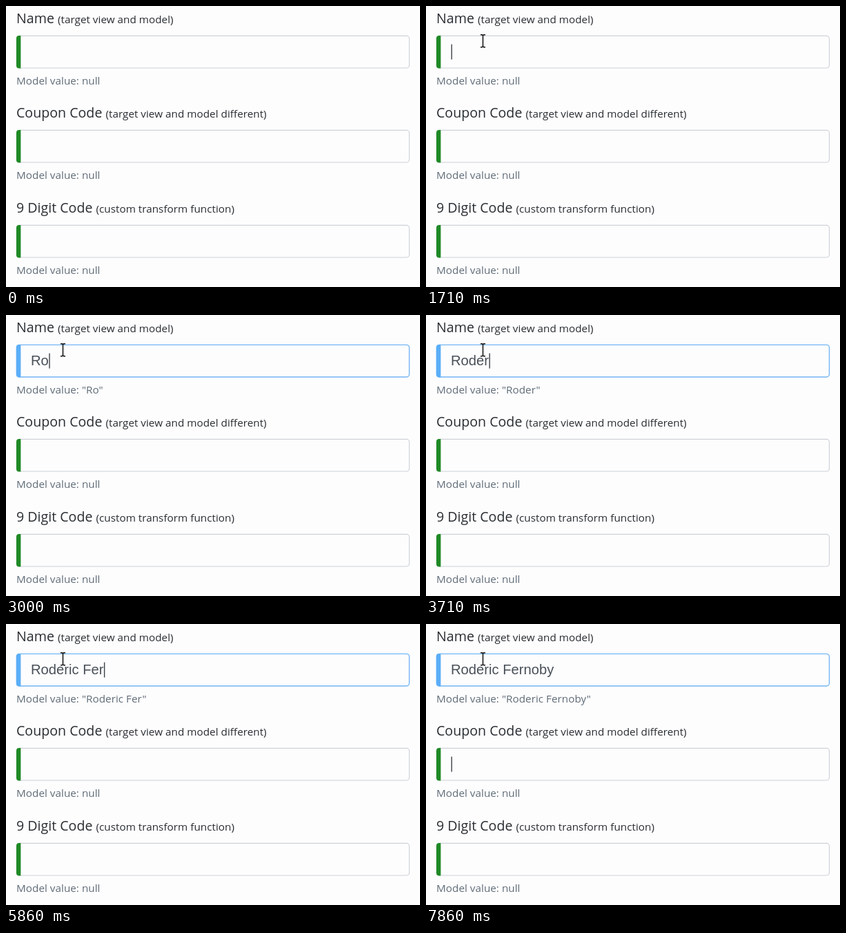
An HTML page that plays this animation: 600 px wide and 408 px high, repeating every 8 s.

```html
<!DOCTYPE html>
<html lang="en">
<head>
<meta charset="utf-8">
<title>Form inputs</title>
<style>
  html, body { margin: 0; width: 100%; height: 100%; overflow: hidden; background: #fdfdfe; }
  svg { display: block; width: 600px; height: 408px; }
  text { font-family: "Open Sans", "Noto Sans", sans-serif; white-space: pre; }
  .label { font-size: 19.6px; fill: #292d31; }
  .label tspan, .model { font-size: 15.3px; }
  .model { fill: #606c77; }
  .value { font: 20.2px "Liberation Sans", Arial, sans-serif; fill: #495057; }
  .box { fill: #fdfdfe; stroke: #ced2d8; stroke-width: 1.2; }
  .bar { fill: #1f8a25; }
  .focus .box { stroke: #74b6f3; stroke-width: 1.4; }
  .focus .bar { fill: #5aaef8; }
  .arrow { fill: #fff; stroke: #111; stroke-width: 1.2; }
  .beam { fill: none; stroke: #111; stroke-width: 1.5; }
</style>
</head>
<body>
<svg viewBox="0 0 600 408">
  <g id="rows"></g>
  <rect id="caret" width="1.4" height="22" fill="#3c4248"/>
  <path id="arrow" class="arrow" d="M0 0V19.8L4.6 15.8L8 23.3L11.2 21.9L8 14.6H13.8Z"/>
  <path id="beam" class="beam" d="M-3.5 -9H-1.2L0 -8L1.2 -9H3.5M0 -8V8M-3.5 9H-1.2L0 8L1.2 9H3.5"/>
</svg>
<script>
const LOOP = 8000, ROW = 137.4, TEXT_X = 36;
const NAME = "Roderic Fernoby";
const KEY_TIMES = [2860, 3000, 3290, 3570, 3710, 4000, 4290, 4710, 4860,
                   5570, 5860, 6000, 6430, 6570, 6860];
const FOCUS = 1710, NEXT_FOCUS = 7860, BLINK = 550;
// [time, x, y] of the pointer; it turns into a text beam inside the field
const POINTER = [[860, 98, 14], [1000, 86, 26], [1140, 78, 36], [1290, 80, 46], [1430, 82.5, 50.7]];
const LABELS = [
  ["Name", "target view and model"],
  ["Coupon Code", "target view and model different"],
  ["9 Digit Code", "custom transform function"],
];

const $ = selector => document.querySelector(selector);
const rowY = i => Math.round(i * ROW);

$("#rows").innerHTML = LABELS.map(([title, note], i) => `
  <g transform="translate(0 ${rowY(i)})">
    <text class="label" x="15" y="25">${title} <tspan dy="-0.4">(${note})</tspan></text>
    <rect class="box" x="15.3" y="43.4" width="569.2" height="46.6" rx="4"/>
    <path class="bar" d="M21.4 43V90.4H19Q15 90.4 15 86.4V47Q15 43 19 43Z"/>
    <text class="value" x="${TEXT_X}" y="73"></text>
    <text class="model" x="15" y="114">Model value: null</text>
  </g>`).join("");

const nameRow = $("#rows g"), value = $(".value"), model = $(".model");
const caret = $("#caret"), arrow = $("#arrow"), beam = $("#beam");

function show(el, visible) {
  el.style.display = visible ? "" : "none";
}

function drawCaret(t) {
  const next = t >= NEXT_FOCUS;
  const lastKey = KEY_TIMES.filter(k => k <= t).pop() ?? FOCUS;
  const blinkStart = next ? NEXT_FOCUS : lastKey;
  const width = next || !value.textContent ? 0 : value.getComputedTextLength();
  caret.setAttribute("x", TEXT_X + 0.5 + width);
  caret.setAttribute("y", 55.6 + (next ? rowY(1) : 0));
  show(caret, t >= FOCUS && Math.floor((t - blinkStart) / BLINK) % 2 === 0);
}

function drawPointer(t) {
  const [, x, y] = POINTER.filter(p => p[0] <= t).pop() ?? [0, 0, 0];
  for (const el of [arrow, beam]) el.setAttribute("transform", `translate(${x} ${y})`);
  show(arrow, y > 0 && y < 43);
  show(beam, y >= 43);
}

function draw(now) {
  const t = now % LOOP;
  const typed = NAME.slice(0, KEY_TIMES.filter(k => k <= t).length);
  value.textContent = typed;
  model.textContent = "Model value: " + (typed ? `"${typed}"` : "null");
  nameRow.classList.toggle("focus", t >= FOCUS + 150);
  drawCaret(t);
  drawPointer(t);
}

function tick() {
  draw(performance.now());
  requestAnimationFrame(tick);
}
tick();
</script>
</body>
</html>
```
